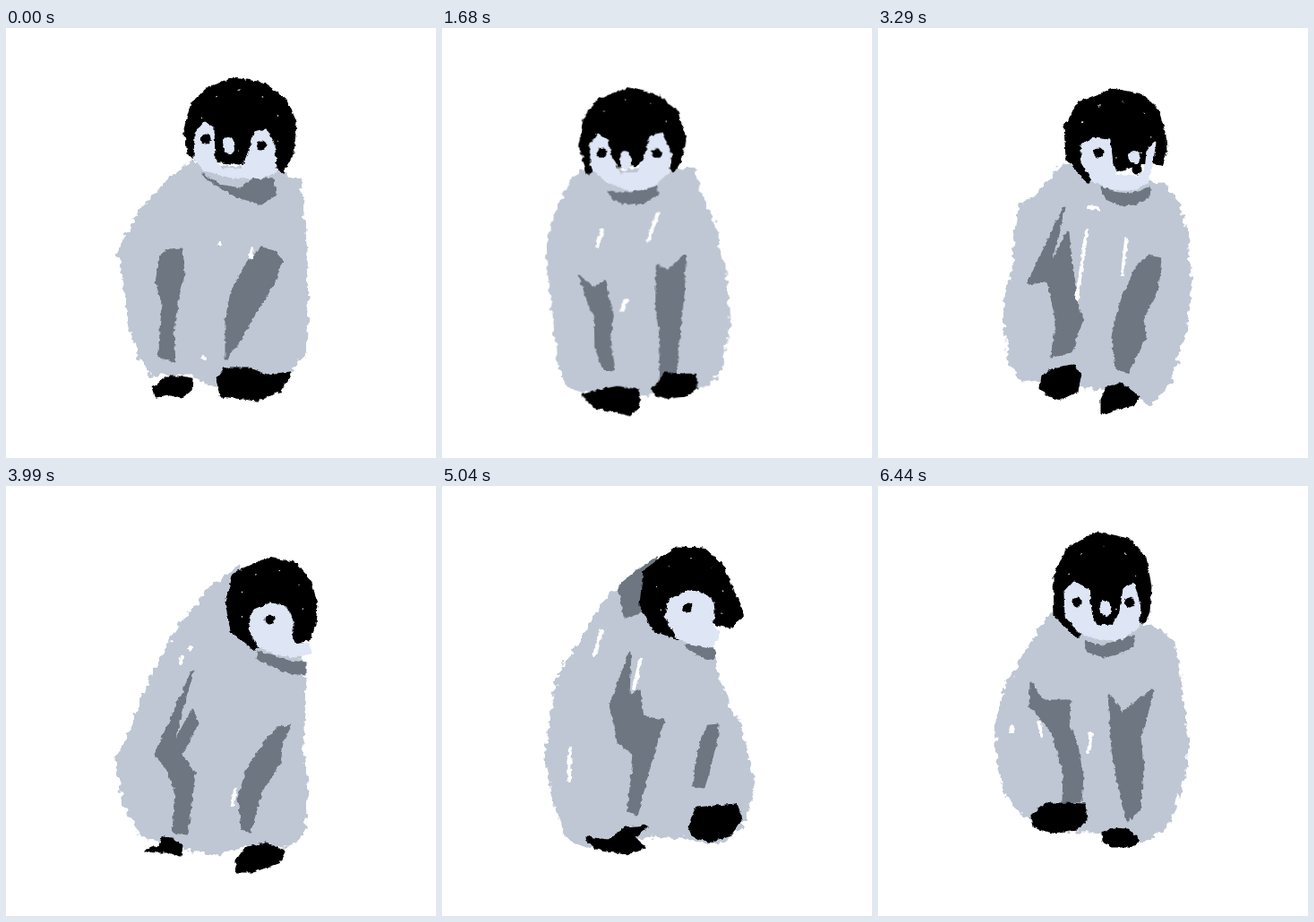
An HTML page without scripts for the animation above (6.51 s loop, 480 px wide and 480 px high).

```html
<!DOCTYPE html>
<html lang="en">
<head>
<meta charset="utf-8">
<title>Waddling chick</title>
<style>
@property --s { syntax: "<number>"; inherits: true; initial-value: 0; }
html, body { margin: 0; width: 100%; height: 100%; overflow: hidden; background: #fff; }
svg { display: block; width: 100vw; height: 100vh; }
path { stroke-width: 3; stroke-linejoin: round; stroke-linecap: round; animation: 6.51s infinite; }
.body { fill: #bfc7d4; stroke: #bfc7d4; animation-name: body; }
.shade { fill: #6e7681; stroke: #6e7681; animation-name: shade; }
.gaps { fill: none; stroke: #fff; stroke-width: 4; animation-name: gaps; }
.head { animation-name: head; }
.flecks {
  fill: none; stroke: #fff; stroke-width: 1.5; stroke-dasharray: 1 38;
  animation-name: head;
  transform-box: fill-box; transform-origin: 50% 40%; transform: scale(.72);
}
.face { fill: #dee5f5; stroke: #dee5f5; animation-name: face; }
.eyes { stroke-width: 11; animation-name: eyes; }
.tip { stroke: #dee5f5; stroke-width: 12; animation-name: tip; }
.head, .eyes, .left, .right { fill: #000; stroke: #000; }
.left { animation-name: left; transform: translateY(min(8px, calc(var(--s) * -.55px))); }
.right { animation-name: right; transform: translateY(min(8px, calc(var(--s) * .55px))); }

/* s is the lean: positive to the right, with the left foot lifted */
.walk { animation: lean 6.51s infinite; }
.sway {
  transform-origin: 235px 410px;
  transform: translateX(calc(var(--s) * .6px)) rotate(calc(var(--s) * .09deg));
}
@keyframes lean {
  0% { --s: 0; animation-timing-function: steps(4); }
  4.301% { --s: 34; animation-timing-function: steps(5); }
  9.677% { --s: -14; animation-timing-function: steps(5); }
  15.053% { --s: 0; animation-timing-function: steps(4); }
  19.354% { --s: 28; animation-timing-function: steps(5); }
  24.731% { --s: -26; animation-timing-function: steps(4); }
  29.032% { --s: 22; animation-timing-function: steps(4); }
  33.333% { --s: -34; animation-timing-function: steps(4); }
  37.634% { --s: 0; animation-timing-function: steps(6); }
  44.086% { --s: -42; animation-timing-function: steps(6); }
  50.537% { --s: 0; animation-timing-function: steps(5); }
  55.913% { --s: -18; animation-timing-function: steps(5); }
  61.29% { --s: 0; animation-timing-function: steps(5); }
  66.666% { --s: 18; animation-timing-function: steps(5); }
  72.043% { --s: -24; animation-timing-function: steps(5); }
  77.419% { --s: 0; animation-timing-function: steps(4); }
  81.72% { --s: 34; animation-timing-function: steps(5); }
  87.096% { --s: -12; animation-timing-function: steps(5); }
  92.473% { --s: 10; animation-timing-function: steps(6); }
  98.924%, 100% { --s: 0; animation-timing-function: step-end; }
}
@keyframes body {
  0%, 100% { animation-timing-function: steps(14); d: path("M205 150L180 172L152 200L140 222L126 250L133 290L138 330L148 365L162 386L205 386L235 400L270 387L312 388L334 362L336 315L335 250L331 205L328 170L302 162Z"); }
  15.053% { animation-timing-function: steps(21); d: path("M156 152L143 172L130 198L120 225L121 255L127 295L130 335L137 380L148 412L180 416L212 408L250 402L300 396L314 385L321 330L313 260L299 212L286 185L278 156Z"); }
  37.634% { animation-timing-function: steps(12); d: path("M185 165L172 170L158 200L147 225L140 255L138 290L142 335L146 375L160 392L195 390L235 410L275 408L312 408L328 375L341 330L342 285L336 235L326 205L312 163Z"); }
  50.537% { animation-timing-function: steps(10); d: path("M207 152L180 185L158 200L153 235L152 270L142 300L140 325L148 375L160 394L195 390L238 402L275 400L305 420L326 395L342 340L349 285L344 235L336 200L322 177Z"); }
  61.29% { animation-timing-function: steps(15); d: path("M258 90L228 115L195 155L172 195L153 235L138 275L124 305L132 355L152 390L195 404L235 410L275 400L310 404L331 390L336 340L330 290L332 250L333 215L332 200Z"); }
  77.419% { animation-timing-function: steps(20); d: path("M218 95L180 130L157 170L130 210L122 255L116 305L126 355L138 390L155 402L190 398L230 390L270 392L310 398L337 375L348 330L333 270L318 240L306 210L302 185Z"); }
  98.924% { animation-timing-function: step-end; d: path("M195 140L178 165L160 195L144 222L132 262L134 310L143 345L165 368L180 380L205 384L235 384L265 392L303 394L325 375L343 320L345 275L338 225L330 175L308 157Z"); }
}
/* collar, left wing, right wing, nape */
@keyframes shade {
  0%, 100% { animation-timing-function: steps(14); d: path("M220 164L238 176L262 180L278 168L298 170L300 186L285 196L258 188ZM172 255L182 248L196 247L198 275L190 308L186 340L188 372L172 366L173 335L176 308L168 285ZM268 265L284 246L297 248L308 260L298 285L278 318L258 352L246 368L246 325L252 295ZM260 90L250 90L250 100L250 110L260 110Z"); }
  15.053% { animation-timing-function: steps(21); d: path("M183 176L200 180L220 178L241 169L242 178L225 188L212 192L196 186ZM155 273L172 293L176 274L182 295L194 296L190 340L192 384L182 384L178 350L174 320L165 295ZM248 266L256 265L267 266L268 300L267 330L270 355L268 385L246 386L246 350L246 310ZM215 90L205 90L205 100L205 110L215 110Z"); }
  37.634% { animation-timing-function: steps(12); d: path("M216 188L230 190L250 188L265 185L266 196L250 201L232 201L218 196ZM175 276L188 288L213 290L212 315L208 345L203 358L211 376L198 374L185 360L190 325L180 300ZM256 266L272 280L300 242L294 290L285 335L275 365L268 406L259 402L264 350L255 315ZM245 100L235 100L235 110L235 120L245 120Z"); }
  50.537% { animation-timing-function: steps(10); d: path("M250 178L262 184L280 186L303 180L302 188L288 196L270 197L254 190ZM208 200L190 270L212 228L216 270L222 310L228 325L215 362L194 366L200 330L190 282L168 285ZM288 268L302 255L315 258L312 290L295 325L298 345L278 384L266 380L262 345L270 310ZM265 95L255 95L255 105L255 115L265 115Z"); }
  61.29% { animation-timing-function: steps(15); d: path("M282 186L298 190L315 196L334 198L334 210L318 208L298 201L280 192ZM208 207L184 295L208 250L214 265L195 300L210 320L202 388L187 386L190 340L178 312L167 300ZM290 285L305 270L317 268L308 285L305 310L285 340L272 385L264 382L260 348L270 315ZM290 100L275 102L265 108L265 120L280 120Z"); }
  77.419% { animation-timing-function: steps(20); d: path("M274 170L284 172L295 178L304 184L303 192L293 192L282 186L273 178ZM210 186L208 235L220 228L224 258L247 262L232 310L218 366L208 362L215 300L197 285L188 245ZM290 285L298 268L308 267L306 285L302 300L297 320L292 336L281 334L283 318L286 300ZM240 80L218 95L198 112L204 146L224 140Z"); }
  98.924% { animation-timing-function: step-end; d: path("M232 174L248 180L266 174L285 168L285 178L270 186L252 190L234 184ZM171 220L184 240L214 240L212 265L222 290L228 325L226 352L207 352L208 320L195 275L170 245ZM258 233L272 254L306 228L300 255L292 280L295 315L292 360L278 374L270 340L262 295ZM255 85L245 85L245 95L245 105L255 105Z"); }
}
@keyframes gaps {
  0%, 100% { animation-timing-function: steps(14); d: path("M239 240L238 241M275 246L273 256M220 368L222 369"); }
  15.053% { animation-timing-function: steps(21); d: path("M200 242L201 243M268 192L267 193M170 391L171 392"); }
  37.634% { animation-timing-function: steps(12); d: path("M182 205L168 243M238 224L216 285M268 206L256 228"); }
  50.537% { animation-timing-function: steps(10); d: path("M233 226L222 302M277 236L273 275M235 200L246 201"); }
  61.29% { animation-timing-function: steps(15); d: path("M197 190L195 198M256 338L253 356M206 180L205 182"); }
  77.419% { animation-timing-function: steps(20); d: path("M178 162L170 188M222 192L214 226M143 292L142 328"); }
  98.924% { animation-timing-function: step-end; d: path("M180 264L182 278M238 276L235 298M150 268L149 274"); }
}
@keyframes head {
  0%, 100% { animation-timing-function: steps(14); d: path("M204 140L200 112L208 84L226 67L255 57L287 62L312 80L323 105L320 140L309 160L300 155L212 146Z"); }
  15.053% { animation-timing-function: steps(21); d: path("M158 148L154 118L160 90L180 70L212 61L245 72L264 92L270 120L268 142L262 150L252 140L170 140Z"); }
  37.634% { animation-timing-function: steps(12); d: path("M197 174L185 140L190 110L205 88L238 75L270 81L292 98L302 125L294 155L283 174L275 160L206 174Z"); }
  50.537% { animation-timing-function: steps(10); d: path("M234 172L211 145L209 110L224 84L262 69L295 75L312 92L320 120L321 138L317 152L300 150L240 165Z"); }
  61.29% { animation-timing-function: steps(15); d: path("M278 182L252 162L246 130L255 98L292 81L322 86L340 107L346 132L344 155L338 172L320 174L290 175Z"); }
  77.419% { animation-timing-function: steps(20); d: path("M262 170L236 160L222 132L226 95L262 69L292 70L312 88L324 115L336 142L322 158L300 152L270 160Z"); }
  98.924% { animation-timing-function: step-end; d: path("M222 168L198 145L197 100L212 70L245 52L280 60L298 80L304 112L302 140L297 153L288 150L230 160Z"); }
}
@keyframes face {
  0%, 100% { animation-timing-function: steps(14); d: path("M222 106L212 118L211 145L222 158L255 167L285 166L300 160L299 130L290 114L278 117L272 140L264 157L241 158L232 146L231 112Z"); }
  15.053% { animation-timing-function: steps(21); d: path("M173 112L165 125L165 152L185 166L210 174L240 170L254 155L257 135L245 112L230 115L223 132L216 156L197 157L188 138L184 120Z"); }
  37.634% { animation-timing-function: steps(12); d: path("M207 125L198 135L199 155L213 176L240 188L262 182L280 168L284 150L276 126L267 130L263 152L250 169L229 169L219 152L216 132Z"); }
  50.537% { animation-timing-function: steps(10); d: path("M240 124L228 130L228 150L240 170L262 180L285 180L300 172L305 155L309 128L301 138L299 160L290 167L266 165L261 150L258 126Z"); }
  61.29% { animation-timing-function: steps(15); d: path("M295 132L276 140L272 160L282 178L300 186L322 190L340 186L338 177L322 177L318 168L319 162L320 155L316 142L310 136L303 133Z"); }
  77.419% { animation-timing-function: steps(20); d: path("M275 118L254 128L250 146L262 168L278 176L300 180L306 172L308 162L300 156L302 148L303 144L303 140L302 130L295 123L285 119Z"); }
  98.924% { animation-timing-function: step-end; d: path("M218 108L209 118L210 145L225 163L250 171L272 170L290 158L292 135L285 110L275 115L271 140L264 156L244 157L238 146L234 115Z"); }
}
@keyframes eyes {
  0%, 100% { animation-timing-function: steps(14); d: path("M223 124h.1M285 131h.1"); }
  15.053% { animation-timing-function: steps(21); d: path("M177 132h.1M239 132h.1"); }
  37.634% { animation-timing-function: steps(12); d: path("M209 145h.1M270 149h.1"); }
  50.537% { animation-timing-function: steps(10); d: path("M246 139h.1M289 158h.1"); }
  61.29% { animation-timing-function: steps(15); d: path("M294 149h.1M330 125h.1"); }
  77.419% { animation-timing-function: steps(20); d: path("M274 136h.1M300 105h.1"); }
  98.924% { animation-timing-function: step-end; d: path("M222 129h.1M281 130h.1"); }
}
@keyframes tip {
  0%, 100% { animation-timing-function: steps(14); d: path("M248 128L249 135"); }
  15.053% { animation-timing-function: steps(21); d: path("M202 136L200 146"); }
  37.634% { animation-timing-function: steps(12); d: path("M238 149L240 157"); }
  50.537% { animation-timing-function: steps(10); d: path("M286 143L287 146"); }
  61.29% { animation-timing-function: steps(15); d: path("M326 183L328 184"); }
  77.419% { animation-timing-function: steps(20); d: path("M288 165L290 166"); }
  98.924% { animation-timing-function: step-end; d: path("M253 134L254 139"); }
}
@keyframes left {
  0%, 100% { animation-timing-function: steps(14); d: path("M165 402L178 390L195 390L207 392L206 404L195 412L180 408L168 411Z"); }
  15.053% { animation-timing-function: steps(21); d: path("M170 418L190 412L205 401L234 403L236 418L225 428L205 428L190 422Z"); }
  37.634% { animation-timing-function: steps(12); d: path("M163 382L185 377L205 384L220 390L219 410L208 418L190 408L165 405Z"); }
  50.537% { animation-timing-function: steps(10); d: path("M184 388L200 380L218 377L226 390L222 405L205 413L190 410L182 402Z"); }
  61.29% { animation-timing-function: steps(15); d: path("M157 407L172 402L175 392L184 394L196 402L194 413L182 408L170 408Z"); }
  77.419% { animation-timing-function: steps(20); d: path("M162 393L185 396L206 382L228 380L214 392L226 404L205 410L172 404Z"); }
  98.924% { animation-timing-function: step-end; d: path("M172 368L188 355L212 355L230 356L232 372L222 382L195 386L174 380Z"); }
}
@keyframes right {
  0%, 100% { animation-timing-function: steps(14); d: path("M236 392L245 380L270 380L290 388L318 385L305 405L280 415L240 410Z"); }
  15.053% { animation-timing-function: steps(21); d: path("M248 395L264 378L285 380L296 380L298 395L288 406L265 410L250 406Z"); }
  37.634% { animation-timing-function: steps(12); d: path("M240 430L252 412L272 413L287 414L286 428L270 433L255 432L246 432Z"); }
  50.537% { animation-timing-function: steps(10); d: path("M250 415L256 402L270 397L280 404L291 412L285 420L265 425L250 430Z"); }
  61.29% { animation-timing-function: steps(15); d: path("M258 418L268 404L290 400L310 408L304 420L292 424L275 430L258 430Z"); }
  77.419% { animation-timing-function: steps(20); d: path("M276 380L284 360L305 358L328 356L334 372L322 388L298 397L280 390Z"); }
  98.924% { animation-timing-function: step-end; d: path("M251 388L262 383L278 384L288 392L291 397L278 402L262 402L252 396Z"); }
}
</style>
</head>
<body>
<svg viewBox="0 0 480 480">
  <!-- crayon edges, redrawn every 70 ms: coarse for the down, fine for the rest -->
  <filter id="coarse" filterUnits="userSpaceOnUse" x="0" y="0" width="480" height="480" color-interpolation-filters="sRGB">
    <feTurbulence type="fractalNoise" baseFrequency=".14" numOctaves="2" seed="3" result="grain">
      <animate attributeName="seed" values="3;8;14" calcMode="discrete" dur=".21s" repeatCount="indefinite"/>
    </feTurbulence>
    <feDisplacementMap in="SourceGraphic" in2="grain" scale="11" xChannelSelector="R" yChannelSelector="G"/>
  </filter>
  <filter id="fine" filterUnits="userSpaceOnUse" x="0" y="0" width="480" height="480" color-interpolation-filters="sRGB">
    <feTurbulence type="fractalNoise" baseFrequency=".18" numOctaves="2" seed="5" result="grain">
      <animate attributeName="seed" values="5;9;17" calcMode="discrete" dur=".21s" repeatCount="indefinite"/>
    </feTurbulence>
    <feDisplacementMap in="SourceGraphic" in2="grain" scale="5" xChannelSelector="R" yChannelSelector="G"/>
  </filter>
  <g class="walk">
    <g class="sway">
      <g filter="url(#coarse)">
        <path class="body"/>
      </g>
      <g filter="url(#fine)">
        <path class="shade"/>
        <path class="gaps"/>
        <path class="head"/>
        <path class="flecks"/>
        <path class="face"/>
        <path class="eyes"/>
        <path class="tip"/>
        <path class="left"/>
        <path class="right"/>
      </g>
    </g>
  </g>
</svg>
</body>
</html>
```
